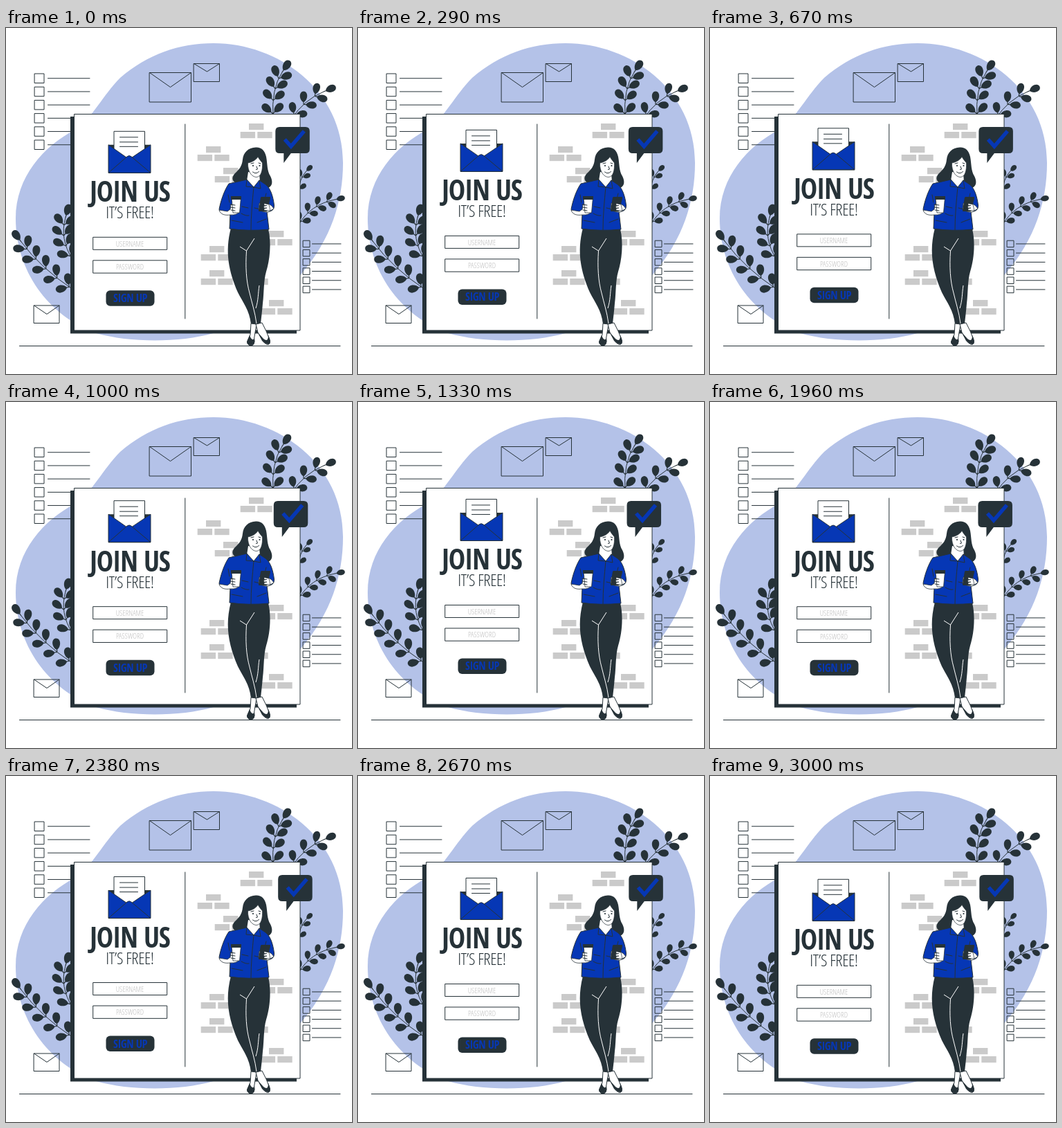
An HTML page that plays this animation: 500 px wide and 500 px high, repeating every 3.04 s.

```html
<!DOCTYPE html>
<html lang="en">
<head>
<meta charset="utf-8">
<title>Join us</title>
<style>
  html, body { margin: 0; width: 100%; height: 100%; overflow: hidden; background: #fff; }
  svg { display: block; width: 100%; height: 100%; }
  .line { fill: none; stroke: #263238; stroke-width: 1; stroke-linejoin: round; stroke-linecap: round; }
  .box { fill: #fff; stroke: #263238; }
  .dark { fill: #263238; }
  .blue { fill: #0637b5; }
  .grey { fill: #cacaca; }
  text {
    font-family: "Open Sans Condensed", "Open Sans", "Noto Sans", sans-serif;
    font-stretch: 75%;
    text-anchor: middle;
  }
  .title { font-size: 41px; font-weight: 700; letter-spacing: -1.1px; }
  .action { font-size: 16.5px; font-weight: 700; letter-spacing: -.5px; }
  .thin {
    font-family: "Open Sans Condensed Light", "Noto Sans ExtraCondensed Light", "Roboto Condensed Light", "Roboto Condensed", "Open Sans", sans-serif;
    font-weight: 300;
  }
  .sub { font-size: 24px; letter-spacing: -.4px; }
  .hint { font-size: 11px; fill: #bdbdbd; }
</style>
</head>
<body>
<svg viewBox="0 0 500 500">
  <path fill="#b4c2e8" d="M300 22C393 22 487 89 487 195C487 250 470 305 427 355C400 390 345 430 300 441C250 455 180 455 130 441C60 415 14 350 14 275C14 215 55 170 100 147C125 130 140 97 165 72C205 38 250 22 300 22Z"/>
  <g id="plants"></g>
  <g id="lists" class="line"></g>
  <g class="line">
    <path d="M207.500 64.500H267.500V107H207.500ZL237.500 85.500L267.500 64.500"/>
    <path d="M271.500 51.500H308.500V77.500H271.500ZL290.500 63L308.500 51.500"/>
    <path d="M40.500 401H77V426.500H40.500ZL59 413.500L77 401"/>
    <path d="M19.500 459.500H483"/>
  </g>

  <path class="dark" d="M93 128H420V441.500H93Z"/>
  <path class="box" d="M98.500 124.500H425V437H98.500Z"/>
  <path class="line" d="M258.800 139V420"/>
  <g id="bricks" class="grey"></g>

  <g id="form">
    <path class="dark" d="M148 169H209V192H148Z"/>
    <path class="box" d="M156 149.500H200.500V195H156Z"/>
    <path class="line" d="M164.500 158H190.500M164.500 165H190.500M164.500 171.500H190.500"/>
    <path class="blue" stroke="#263238" d="M148 169L178 190L209 169V209.500H148Z"/>
    <path class="blue" stroke="#263238" stroke-linejoin="round" d="M148 209.500L175 186Q178 183.500 181 186L209 209.500Z"/>
    <text class="title dark" x="179" y="251.500">JOIN US</text>
    <text class="thin sub dark" x="179" y="275.500">IT’S FREE!</text>
    <path class="box" d="M125.700 302.500H232.700V320.500H125.700ZM125.700 336H232.700V354.300H125.700Z"/>
    <text class="thin hint" x="179" y="315.800">USERNAME</text>
    <text class="thin hint" x="179" y="349.300">PASSWORD</text>
    <rect class="dark" x="144.500" y="379.500" width="70" height="22.500" rx="6"/>
    <text class="action blue" x="179.500" y="396.500">SIGN UP</text>
  </g>

  <g id="woman">
    <path class="dark" d="M361 172.500C350 173 343 180 342 190C341 200 337 204 332 209C324 216 327 225 338 224L350 232H374C386 231 386 222 382 214C377 206 378 197 376 186C374 177 369 172 361 172.500Z"/>
    <path fill="#fff" d="M350 208L366 210L367 222L358 231L348 221Z"/>
    <path class="box" stroke-width=".7" d="M349.500 195C356 194 362 190 364 186C366 190 369 193 370.500 195C371 205 369 215 362 215.500C355 215.500 349 207 349.500 195Z"/>
    <path class="line" d="M354 196L358 195M365 195L368 196M362 200L363.500 204L361.500 204.500M356.500 208Q361 212 365.500 207.500" stroke-width=".8"/>
    <circle class="dark" cx="357" cy="199" r="1.100"/>
    <circle class="dark" cx="366.500" cy="199" r="1.100"/>

    <path class="dark" d="M325 289L379 290C384 312 381 336 376 352C372 366 373 382 371 398C370 410 369 418 368 427L360 429L354 428C352 408 342 396 335 382C322 352 316 324 325 289Z"/>
    <path d="M338 316L347.500 322L359 304M347.500 322C346 345 347 365 352 383C355 396 360 411 362 427M366 372C364 385 365 392 361 405" fill="none" stroke="#fff"/>
    <path class="box" d="M354 427L353 443L348.500 453Q349 459 355 459Q360 457 358.500 449L362 428Z"/>
    <path class="dark" d="M352 444L348 454Q349 459 354 459Q361 459 359 448Q356 454 352 444Z"/>
    <path class="box" d="M361 428L364 440L371 452Q376 459 380 457Q383 454 380 448L376 438L370 426Z"/>
    <path class="dark" d="M364 440L370 452Q377 459 381 456Q383 452 379 444Q379 455 372 449Z"/>

    <path class="blue" stroke="#263238" d="M348 219L322 225C315 235 310 251 308 262C309 268 316 269 324 268L323 290Q350 294 380 291L377 265C384 266 388 262 387.500 256C386 243 382 231 375 226L366 220L358 230Z"/>
    <path class="line" d="M348 219L347 229L358 230L368 232L366 220M358 230C356 251 354 271 354 292M321 241L323 252M376 239L374 247M341 258L350 260M359 260L367 262M326 278L342 281M363 281L376 276M340 268Q347 272 351 271"/>

    <path class="box" stroke-width=".8" d="M308 263C310 270 317 271 324 270Q335 271 338 264L330 254L325 255L324 262L320 265Z"/>
    <path class="box" stroke-width=".8" d="M326 245H339.500L337.500 267H328Z"/>
    <path class="dark" d="M325 243H340V248H325Z"/>
    <path class="line" d="M324 255L331 256M324 259L331 260M325 263L331 264"/>
    <path class="box" stroke-width=".8" d="M366 253L365 262Q371 267 379 266L387 261L384 257L378 253Z"/>
    <path class="dark" d="M369 244H381Q382.500 244 382 246L378 263Q377.500 265 376 265H366Q364.500 265 365 263L368 245Z"/>
    <path class="box" stroke-width=".7" d="M380 255L373 253.500V256.500H377L372.500 257.500V260H377L373 261V263.500L382 264Z"/>
  </g>

  <g id="bubble">
    <path class="dark" d="M395.500 143H433Q439 143 439 149V175Q439 181 433 181H412L401.500 195V181H395.500Q389.500 181 389.500 175V149Q389.500 143 395.500 143Z"/>
    <path fill="none" stroke="#0637b5" stroke-width="5.500" d="M403 161L412 171L431 149"/>
  </g>
</svg>
<script>
const byId = id => document.getElementById(id);

// A stem along a quadratic curve with pairs of leaves and one at the tip.
function plant([x0, y0], [x1, y1], [x2, y2], pairs, size) {
  const mix = (a, b, c, u) => (1 - u) ** 2 * a + 2 * u * (1 - u) * b + u * u * c;
  const leaf = (u, turn) => {
    const dx = (1 - u) * (x1 - x0) + u * (x2 - x1);
    const dy = (1 - u) * (y1 - y0) + u * (y2 - y1);
    const angle = Math.atan2(dy, dx) * 180 / Math.PI + turn;
    return `<path class="dark" transform="translate(${mix(x0, x1, x2, u)} ${mix(y0, y1, y2, u)}) rotate(${angle}) scale(${size})"
      d="M0 -.03L.18 -.03C.4 -.36 .98 -.36 1 0C.98 .36 .4 .36 .18 .03L0 .03Z"/>`;
  };
  let out = `<path class="line" d="M${x0} ${y0}Q${x1} ${y1} ${x2} ${y2}"/>` + leaf(1, 0);
  for (let i = 0; i < pairs; i++) {
    const u = (i + 0.3) / pairs;
    out += leaf(u, 47) + leaf(u, -47);
  }
  return out;
}

byId('plants').innerHTML = [
  plant([386, 130], [383, 88], [399, 64], 4, 20),
  plant([413, 131], [430, 104], [459, 92], 3, 19),
  plant([423, 284], [440, 255], [475, 248], 4, 15),
  plant([422, 240], [424, 217], [433, 208], 2, 13),
  plant([96, 334], [77, 305], [86, 274], 4, 20),
  plant([97, 378], [50, 347], [22, 309], 5, 20)
].join('');

function checklist(x, y, size, step, lineStart, lineEnd) {
  let d = '';
  for (let i = 0; i < 6; i++) {
    const top = y + i * step;
    d += `M${x} ${top}h${size}v${size}h${-size}zM${lineStart} ${top + size / 2}H${lineEnd}`;
  }
  return `<path d="${d}"/>`;
}
byId('lists').innerHTML =
  checklist(41.5, 66, 13.5, 19.2, 60.5, 121) +
  checklist(429.5, 307.2, 9.5, 13.2, 442.5, 484);

const brickTops = [[351, 138], [289, 171], [314, 202], [380, 293], [294, 315], [294, 350], [345, 350], [380, 393]];
byId('bricks').innerHTML = brickTops.map(([x, y]) =>
  [[0, 0], [-12.3, 12], [12.3, 12]].map(([dx, dy]) =>
    `<rect x="${x + dx}" y="${y + dy}" width="21.4" height="9.2"/>`).join('')).join('');

const LOOP = 3040, LEAD = 25, FLOAT = 3000, SHAKE = 1500;
const shakeStops = [0, -1, 2, -4, 4, -4, 4, -4, 2, -1, 0];

function draw(time) {
  const t = time % LOOP + LEAD;
  const rise = 10 * (1 - Math.abs(1 - 2 * (t % FLOAT) / FLOAT));
  const pos = (t % SHAKE) / SHAKE * 10;
  const i = Math.floor(pos);
  const shift = shakeStops[i] + (shakeStops[i + 1] - shakeStops[i]) * (pos - i);
  byId('form').setAttribute('transform', `translate(0 ${-rise})`);
  byId('bubble').setAttribute('transform', `translate(${shift} 0)`);
}

const start = performance.now();
function tick() {
  draw(performance.now() - start);
  requestAnimationFrame(tick);
}
tick();
</script>
</body>
</html>
```
